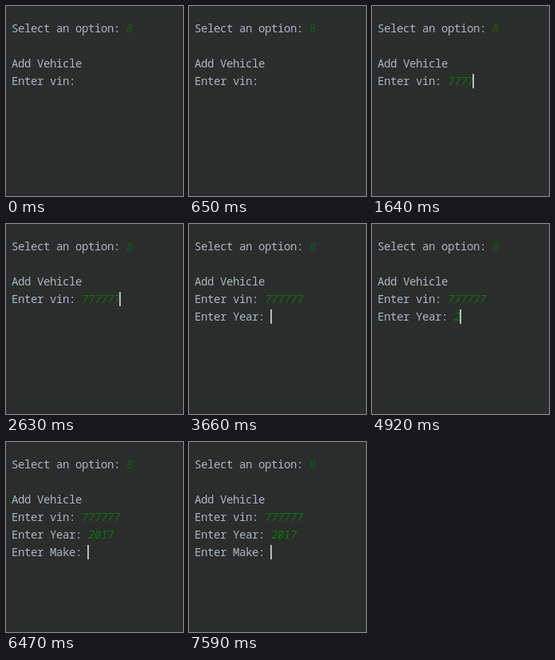
Animation of 222x238 px, one loop 8000 ms. Source, as an HTML page:

```html
<!DOCTYPE html>
<html lang="en">
<head>
<meta charset="utf-8">
<style>
  html, body { margin: 0; width: 100%; height: 100%; overflow: hidden; background: #2b2d2c; }
  pre {
    position: absolute; left: 7px; top: 17px; margin: 0;
    font: 500 14px/22px "Noto Sans Mono", monospace;
    letter-spacing: calc(8px - 1ch);
    color: #a9b7c6;
  }
  i { display: inline-block; font-style: normal; transform: skewX(-9deg); color: #0b760b; }
  #option { color: #17591f; }
  #caret { position: absolute; width: 2px; height: 18px; background: #bbb; }
</style>
</head>
<body>
<pre>Select an option: <i id="option">8</i>

Add Vehicle
Enter vin: <i id="vin"></i>
<span id="yearRow">Enter Year: <i id="year"></i></span>
<span id="makeRow">Enter Make: </span></pre>
<div id="caret"></div>
<script>
const LOOP = 8000, CHAR = 8, LINE = 22;
const vinKeys = [780, 1110, 1370, 1640, 1970, 2630];
const yearKeys = [4920, 5120, 5320, 5670];
const yearAt = 3660, makeAt = 6470;
const caretOff = [[0, 120], [650, 780], [3590, 3660], [4590, 4920], [7130, 7590]];
const el = id => document.getElementById(id);
const typed = (text, keys, t) => text.slice(0, keys.filter(k => k <= t).length);

function draw(t) {
  const vin = typed("777777", vinKeys, t);
  const year = typed("2017", yearKeys, t);
  el("vin").textContent = vin;
  el("year").textContent = year;
  el("yearRow").style.visibility = t >= yearAt ? "visible" : "hidden";
  el("makeRow").style.visibility = t >= makeAt ? "visible" : "hidden";

  const [row, col] = t >= makeAt ? [5, 12]
    : t >= yearAt ? [4, 12 + year.length]
    : [3, 11 + vin.length];
  const caret = el("caret").style;
  caret.left = 6 + col * CHAR + "px";
  caret.top = 19 + row * LINE + "px";
  caret.visibility = caretOff.some(([from, to]) => t >= from && t < to) ? "hidden" : "visible";
}

const start = performance.now();
function frame() {
  draw((performance.now() - start) % LOOP);
  requestAnimationFrame(frame);
}
frame();
</script>
</body>
</html>
```
